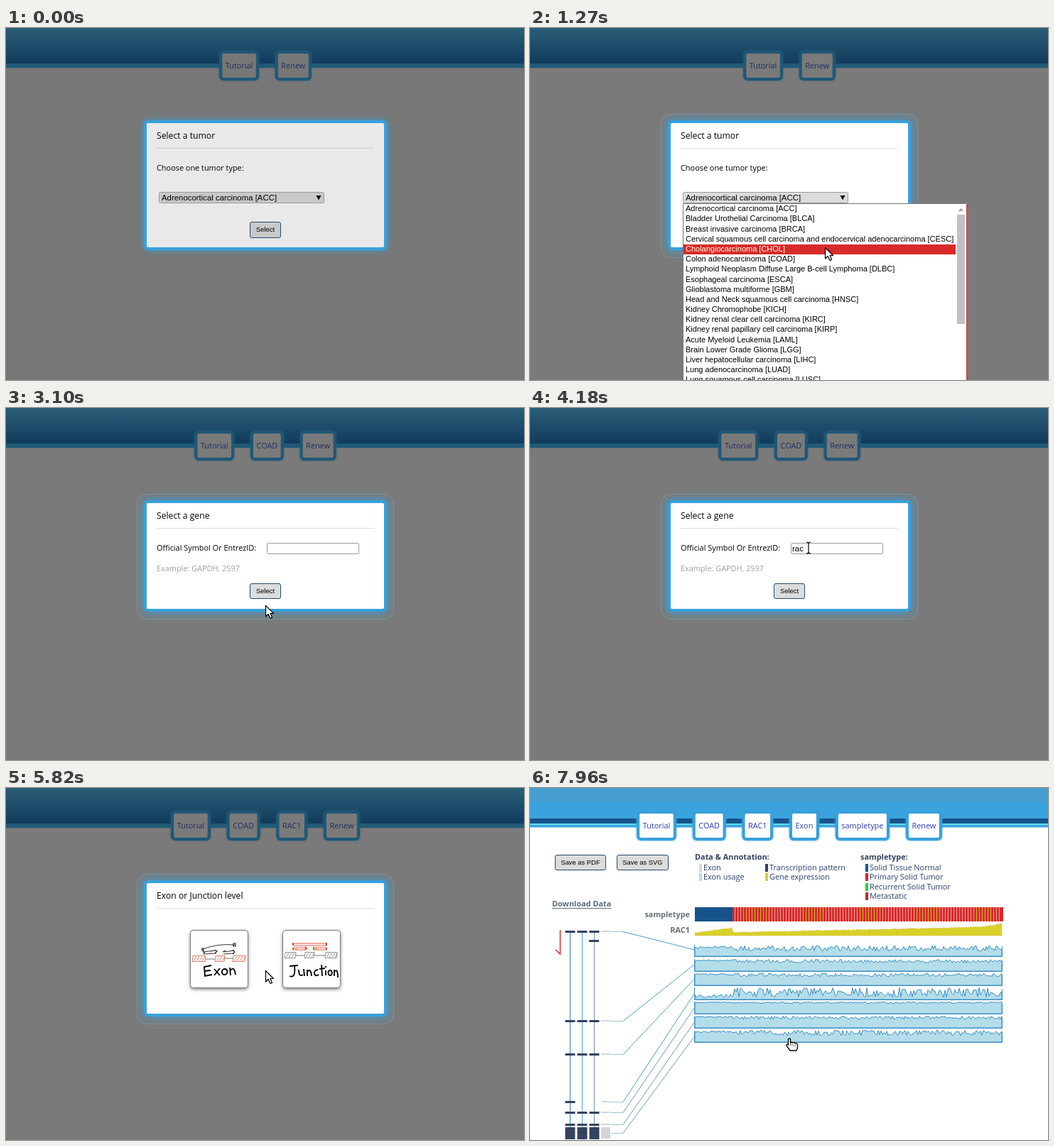
These frames come from a looping animation (729 px wide and 496 px high, 8 s). An HTML page with a canvas:

```html
<!DOCTYPE html>
<html lang="en">
<head>
<meta charset="utf-8">
<title>Tumor browser walkthrough</title>
<style>
html, body { margin: 0; width: 100%; height: 100%; overflow: hidden; background: #7a7a7a; }
canvas { display: block; }
</style>
</head>
<body>
<canvas id="stage" width="729" height="496"></canvas>
<script>
const c = document.getElementById('stage').getContext('2d');
const LOOP = 8000;
const UI = '10.9px "Open Sans", sans-serif';
const TITLE = '12.2px "Open Sans", sans-serif';
const BOLD = 'bold ' + UI;
const arial = size => `${size}px "Liberation Sans", Arial, sans-serif`;
const BLUE = '#38a0dc', NAVY = '#17538b', RED = '#d82a2a', SLATE = '#34415f';

const tumors = [
  'Adrenocortical carcinoma [ACC]', 'Bladder Urothelial Carcinoma [BLCA]',
  'Breast invasive carcinoma [BRCA]',
  'Cervical squamous cell carcinoma and endocervical adenocarcinoma [CESC]',
  'Cholangiocarcinoma [CHOL]', 'Colon adenocarcinoma [COAD]',
  'Lymphoid Neoplasm Diffuse Large B-cell Lymphoma [DLBC]',
  'Esophageal carcinoma [ESCA]', 'Glioblastoma multiforme [GBM]',
  'Head and Neck squamous cell carcinoma [HNSC]', 'Kidney Chromophobe [KICH]',
  'Kidney renal clear cell carcinoma [KIRC]',
  'Kidney renal papillary cell carcinoma [KIRP]', 'Acute Myeloid Leukemia [LAML]',
  'Brain Lower Grade Glioma [LGG]', 'Liver hepatocellular carcinoma [LIHC]',
  'Lung adenocarcinoma [LUAD]', 'Lung squamous cell carcinoma [LUSC]'];
const genes = [
  'RAC1 [5879] ras-related C3 botulinum toxin substrate 1 (rho family, small GTP binding protein)',
  'RNASE1 [6035] ribonuclease A family member 1, pancreatic',
  'NCOR1 [9611] nuclear receptor corepressor 1',
  'NCOR2 [9612] nuclear receptor corepressor 2',
  'GREM1 [26585] gremlin 1, DAN family BMP antagonist',
  'COA3 [28958] cytochrome c oxidase assembly factor 3',
  'POLE3 [54107] DNA polymerase epsilon 3, accessory subunit',
  'CHRAC1 [54108] chromatin accessibility complex 1',
  'RNF125 [54941] ring finger protein 125',
  'COA1 [55744] cytochrome c oxidase assembly factor 1 homolog'];

// Pointer route: time, x, y
const route = [
  [890, 405, 241], [1270, 415, 309], [1460, 417, 316], [1660, 417, 316],
  [1810, 417, 321], [2060, 417, 321], [2660, 365, 278], [3100, 365, 278],
  [3590, 392, 197], [4640, 392, 197], [4970, 389, 210], [5200, 389, 210],
  [5780, 365, 257], [6220, 365, 257], [6520, 310, 253], [6860, 310, 253],
  [7350, 365, 353]];

function pointer(t) {
  const i = route.findIndex(p => p[0] > t);
  if (i === 0) return route[0].slice(1);
  if (i < 0) return route[route.length - 1].slice(1);
  const [t0, x0, y0] = route[i - 1], [t1, x1, y1] = route[i];
  const k = (t - t0) / (t1 - t0);
  return [x0 + (x1 - x0) * k, y0 + (y1 - y0) * k];
}

const inside = ([x, y], l, top, r, b) => x >= l && x <= r && y >= top && y <= b;

function text(s, x, y, color = '#000', font = UI, align = 'left') {
  c.font = font;
  c.fillStyle = color;
  c.textAlign = align;
  c.fillText(s, x, y);
}

function rect(x, y, w, h, color) {
  c.fillStyle = color;
  c.fillRect(x, y, w, h);
}

function box(x, y, w, h, r, fill, stroke) {
  c.beginPath();
  c.roundRect(x, y, w, h, r);
  if (fill) { c.fillStyle = fill; c.fill(); }
  if (stroke) { c.strokeStyle = stroke; c.lineWidth = 1; c.stroke(); }
}

function path(d, color, width = 1, fill) {
  const p = new Path2D(d);
  if (fill) { c.fillStyle = fill; c.fill(p); }
  c.strokeStyle = color;
  c.lineWidth = width;
  c.stroke(p);
}

function glow(color, blur, draw) {
  c.shadowColor = color;
  c.shadowBlur = blur;
  draw();
  c.shadowColor = 'transparent';
  c.shadowBlur = 0;
}

function nav(labels, edge, fill, ink) {
  c.font = UI;
  const widths = labels.map(s => c.measureText(s).width + 17);
  let x = 365 - (widths.reduce((a, b) => a + b) + 23 * (labels.length - 1)) / 2;
  labels.forEach((s, i) => {
    const w = widths[i];
    glow(edge, 3, () => box(x, 32, w, 42, 6, edge));
    box(x + 4, 36, w - 8, 34, 2, fill);
    text(s, x + w / 2, 57, ink, UI, 'center');
    x += w + 23;
  });
}

function button(s, x, y, w, h, hover, face = '#dcdcdc') {
  box(x + .5, y + .5, w - 1, h - 1, 2.5, hover ? NAVY : face, hover ? NAVY : '#234a70');
  text(s, x + w / 2, y + 14, hover ? '#fff' : '#000', arial(9.4), 'center');
}

function combo(s, face = '#dcdcdc') {
  box(215.5, 231.5, 232, 15, 2, face, '#999');
  text(s, 219, 243, '#000', arial(11.4));
  c.beginPath();
  c.moveTo(436.5, 236); c.lineTo(443.5, 236); c.lineTo(440, 242.5);
  c.fill();
}

function field(s, x, y) {
  box(x + .5, y + .5, 129, 15, 2, '#fff', '#999');
  text(s, x + 2, y + 12, '#000', arial(11.4));
}

function dialog(title, bottom, halo, face = '#fff') {
  const h = bottom - 130;
  if (halo) box(184.5, 121.5, 361, h + 20 - 1, 14, 'rgba(110,135,150,.16)', 'rgba(130,155,168,.75)');
  glow(BLUE, halo ? 13 : 8, () => box(194, 130, 342, h, 6, BLUE));
  box(198, 134, 334, h - 8, 2, face);
  text(title, 212, 156, '#000', TITLE);
  rect(212, 169, 306, 1, face === '#fff' ? '#ddd' : '#ccc');
}

function tumorDialog(t, p) {
  const face = t < 560 ? '#c9c9c9' : '#dcdcdc';
  dialog('Select a tumor', 313, t >= 560, t < 560 ? '#e9e9e9' : '#fff');
  text('Choose one tumor type:', 212, 201);
  combo(tumors[t < 2060 ? 0 : 5], face);
  button('Select', 343, 273, 44, 23, t > 2060 && inside(p, 343, 273, 387, 296), face);
  if (t < 600 || t >= 2060) return;
  rect(215, 247, 400, 249, '#fff');
  path('M215.5 496V247.5H614.5', '#777');
  path('M614.5 248V496', '#c93a3a');
  const pitch = 14.18;
  const active = Math.max(0, Math.floor((p[1] - 248) / pitch));
  rect(216, Math.round(248 + active * pitch), 383, 14, RED);
  tumors.forEach((s, i) =>
    text(s, 219, Math.round(258.3 + i * pitch), i === active ? '#ffd' : '#000', arial(11)));
  rect(601, 263, 11, 154, '#c1c1c1');
  path('M603 258L606.5 254L610 258Z', '#aaa', .5, '#aaa');
}

function geneDialog(t, p) {
  dialog('Select a gene', 287, t < 4480);
  text('Official Symbol Or EntrezID:', 212, 201);
  const typed = [3840, 3930, 4180, 4480].filter(k => t >= k).length;
  field(t >= 5220 ? 'RAC1' : 'rac1'.slice(0, typed), 367, 190);
  text('Example: GAPDH, 2597', 212, 230, '#a0a0a0');
  button('Select', 343, 247, 44, 22, inside(p, 343, 247, 387, 269));
  if (t < 4600 || t >= 5220) return;
  box(367.5, 206.5, 380, 160, 0, '#fff', '#aaa');
  const active = p[1] > 206;
  if (active) box(367.5, 206.5, 380, 16, 0, '#0a9cff', '#0b4fae');
  genes.forEach((s, i) =>
    text(s, 372, 219 + 16 * i, active && !i ? '#fff' : '#2b2b2b', arial(11.3)));
}

function hatched(x, y, w, color) {
  let d = `M${x} ${y}h${w}l-1 8h${-w}Z`;
  for (let i = 3; i < w; i += 4) d += `M${x + i - 2} ${y + 7}l4 -6`;
  path(d, color, .8);
}

function levelDialog() {
  dialog('Exon or Junction level', 322, true);
  for (const x of [259, 389]) {
    glow('rgba(0,0,0,.55)', 5, () => {
      c.shadowOffsetY = 2;
      box(x + .5, 200.5, 81, 81, 4, '#fff');
      c.shadowOffsetY = 0;
    });
    box(x + .5, 200.5, 81, 81, 4, '#fff', '#777');
  }
  path('M280 241H294M307 240H320', '#555', .8);
  [[263, 18], [295, 13], [320, 17]].forEach(([x, w]) => hatched(x, 236.5, w, '#d8604c'));
  path('M277 227Q297 219 322 221M277 234L296 233M277 231L294 229M306 234L321 233M307 231L321 229', '#333');
  path('M276 226h2v3h-2ZM320 219h3v4h-3ZM293 228l4 2l-3 3M305 231l4 -2M319 228l3 3l-3 3M277 230l3 3', '#222', 1.2);
  path('M287 231h4M311 231h4', '#d7a92c');
  path('M289 250L279 252L280 265L290 263M279 258L288 257M293 255L301 264M301 254L293 264M308 255C302 255 303 264 308 263C313 262 312 255 308 255M315 253L316 264M316 257Q321 250 323 263', '#000', 1.8);

  path('M407 236H420M434 236H449', '#555', .8);
  [[393, 15], [421, 13], [450, 16]].forEach(([x, w]) => hatched(x, 231.5, w, '#777'));
  path('M405 219H451M405 222H451M405 225H422M405 228H421M433 225H451M433 228H451', '#e0543c');
  path('M404 218v4M451 218v4M404 225v3M421 224l2 2l-2 2M433 224v4M451 225v3', '#c22', 1.6);
  path('M407 227h3M435 227h4M447 228h3', '#d7b52c', 1.4);
  path('M399 251L411 250M406 250Q408 269 399 265M412 256Q412 267 418 263M419 255L420 265M424 256V265M424 259Q429 253 430 265M439 256Q433 257 434 262Q436 266 440 263M444 249L445 265M441 255L449 254M450 257V264M450 251v2M456 257C452 257 453 265 457 264C460 262 459 257 456 257M462 256V265M462 259Q467 253 467 267', '#000', 1.8);
}

function phenotypeDialog(p) {
  dialog('Select a phenotype', 383, true);
  text('Choose clinical data:', 212, 201);
  combo('sampletype');
  text('Input Official Symbol Or EntrezID for Sample Sorting:', 212, 284);
  field('RAC1', 212, 301);
  button('Select', 343, 343, 44, 23, inside(p, 343, 343, 387, 366));
}

function wizard(t, p) {
  const gray = t < 560 ? '#777' : '#7a7a7a';
  rect(0, 0, 729, 496, gray);
  const g = c.createLinearGradient(0, 0, 0, 50);
  g.addColorStop(0, '#2a5e78');
  g.addColorStop(1, '#123b5c');
  rect(0, 0, 729, 50, g);
  rect(0, 50, 729, 6, '#205a78');
  rect(0, 56, 729, 1, '#6b6f72');
  const done = [[2810, 'COAD'], [5820, 'RAC1'], [6670, 'Exon']].filter(s => t >= s[0]);
  nav(['Tutorial', ...done.map(s => s[1]), 'Renew'], '#1f5776', gray, '#232d62');
  if (t >= 7840) return;
  [tumorDialog, geneDialog, levelDialog, (t, p) => phenotypeDialog(p)][done.length](t, p);
}

// Repeatable noise in -1..1
const noise = n => {
  const s = Math.sin(n * 127.1 + 11.7) * 43758.5453;
  return (s - Math.floor(s)) * 2 - 1;
};

function tracks() {
  const level = [226, 244, 263.5, 288, 302.5, 323.5, 345];
  const swing = [4, 2.5, 2.5, 7, 1.3, 2.5, 4];
  level.forEach((mid, i) => {
    const top = 221 + i * 20.1, bottom = Math.round(top + 16.4);
    let d = `M232 ${bottom}`;
    for (let x = 232; x <= 664; x += 2) {
      const low = x < 285;
      const m = low ? (i === 3 ? 293 : mid - swing[i] * .4) : mid;
      const y = m + noise(x + i * 733) * swing[i] * (low ? .4 : 1);
      d += `L${x} ${Math.max(top, y).toFixed(1)}`;
    }
    path(d + `V${bottom}Z`, '#3a8fc4', 1, '#b4ddea');
    path(`M231.5 ${top}V${bottom}.5H664.5V${top + 2}`, '#3a8fc4');
  });
}

function geneModel() {
  ['#3b8fc5', '#5ab4d8', '#8495b4'].forEach((color, i) =>
    path(`M${56.5 + 17 * i} 202V486`, color, 1.2));
  [202, 328, 375, 442, 457, 474, 486].forEach((y, i) => {
    const last = i === 6;
    const h = last ? 17 : 3, top = last ? 478 : y - 1;
    for (let k = 0; k < (i === 3 ? 1 : 3); k++) rect(49.5 + 17 * k, top, 14, h, SLATE);
    rect(100, top, 13, last ? 16 : 2, '#d4d5d8');
    path(`M114 ${y + .5}H131`, '#9cc3d6');
    path(`M131 ${y + .5}L232 ${228 + 20.2 * i}`, i > 3 ? '#6f97b4' : '#4a9cc8');
  });
  rect(83, 214, 14, 3, SLATE);
  path('M44 201.5H42.5V234L36 228', RED, 1.5);
}

function results() {
  rect(0, 0, 729, 496, '#fff');
  rect(0, 0, 729, 20, '#479fd1');
  rect(0, 20, 729, 35, '#3aa3dd');
  rect(0, 43, 729, 7, NAVY);
  rect(0, 50, 729, 2, '#62dcec');
  rect(0, 55, 729, 1, '#9fcbe6');
  nav(['Tutorial', 'COAD', 'RAC1', 'Exon', 'sampletype', 'Renew'], BLUE, '#fff', '#2b3cb5');
  button('Save as PDF', 35, 94, 72, 22);
  button('Save as SVG', 122, 94, 73, 22);

  const ink = '#2b3f6b';
  text('Data & Annotation:', 232, 101, SLATE, BOLD);
  text('sampletype:', 465, 101, SLATE, BOLD);
  [['Exon', 238, 0, '#d9d9dc'], ['Exon usage', 238, 1, '#b0dcea'],
   ['Transcription pattern', 331, 0, SLATE], ['Gene expression', 331, 1, '#d6d128'],
   ['Solid Tissue Normal', 472, 0, NAVY], ['Primary Solid Tumor', 472, 1, RED],
   ['Recurrent Solid Tumor', 472, 2, '#2ecc40'], ['Metastatic', 472, 3, '#c62828']
  ].forEach(([s, x, row, color]) => {
    const y = 116 + row * 13.3;
    rect(x, Math.round(y - 9), 4, 11, color);
    text(s, x + 6, y, ink);
  });
  text('Download Data', 31, 167, '#5d6b78', BOLD);
  c.font = BOLD;
  rect(31, 169, c.measureText('Download Data').width, 1, '#5d6b78');
  text('sampletype', 225, 182, '#66707a', BOLD, 'right');
  text('RAC1', 225, 204, '#66707a', BOLD, 'right');

  rect(232, 168, 434, 20, RED);
  rect(232, 168, 53, 20, NAVY);
  for (let x = 288; x < 664; x += 4)
    rect(x, 168, 1, 20, (x - 303 + 80) % 80 < 32 ? '#c9c322' : '#f0a0a0');

  let d = 'M232 208';
  for (let x = 232; x <= 664; x += 2) {
    const k = (x - 285) / 379;
    const y = x < 285 ? 204 - (x - 232) * .13 : 203.5 - 8 * k - 5 * k ** 24;
    d += `L${x} ${(y + noise(x) * .5).toFixed(1)}`;
  }
  path(d + 'V208Z', '#e3c05a', .6, '#d6d128');
  tracks();
  geneModel();
}

function cursor(kind, [x, y]) {
  c.save();
  c.translate(x, y);
  c.lineJoin = 'round';
  if (kind === 'hand') {
    path('M-1.5 1Q0 -1 1.5 1V6Q3 4.500 5 6Q7 5 8 7Q11 6 11.500 9V13L10 17H1L-4 10Q-4.500 7 -1.500 9Z', '#000', 1.3, '#fff');
    path('M5 8V10M8 9V11M2 7V10', '#000', .8);
  } else if (kind === 'beam') {
    path('M-3 -8Q0 -8 0 -6Q0 -8 3 -8M0 -6V6M-3 8Q0 8 0 6Q0 8 3 8', '#000', 1.2);
  } else {
    path('M.5 .5V16L4 12.500L7 18.500L9.500 17.500L7 11.500H11.500Z', '#000', 1.2, '#fff');
  }
  c.restore();
}

function cursorKind(t, p) {
  const hot = (...r) => inside(p, ...r);
  if (t < 2060) return 'arrow';
  if (t < 2810) return hot(343, 273, 387, 296) ? 'hand' : 'arrow';
  if (t < 5820) {
    if (t >= 4600 && t < 5220 && p[1] > 206) return 'hand';
    if (hot(367, 190, 497, 206)) return 'beam';
    return t < 5760 && hot(343, 247, 387, 269) ? 'hand' : 'arrow';
  }
  if (t < 6670) return hot(259, 200, 341, 282) ? 'hand' : 'arrow';
  if (hot(212, 301, 342, 317)) return 'beam';
  return hot(343, 343, 387, 366) ? 'hand' : 'arrow';
}

function draw(t) {
  const p = pointer(t);
  if (t < 7840) wizard(t, p);
  else {
    results();
    c.globalAlpha = Math.max(0, .75 - .25 * Math.floor((t - 7840) / 40));
    if (c.globalAlpha) wizard(t, p);
    c.globalAlpha = 1;
  }
  if (t >= 560) cursor(cursorKind(t, p), p);
}

function tick(now) {
  draw(now % LOOP);
  requestAnimationFrame(tick);
}
draw(0);
requestAnimationFrame(tick);
</script>
</body>
</html>
```
